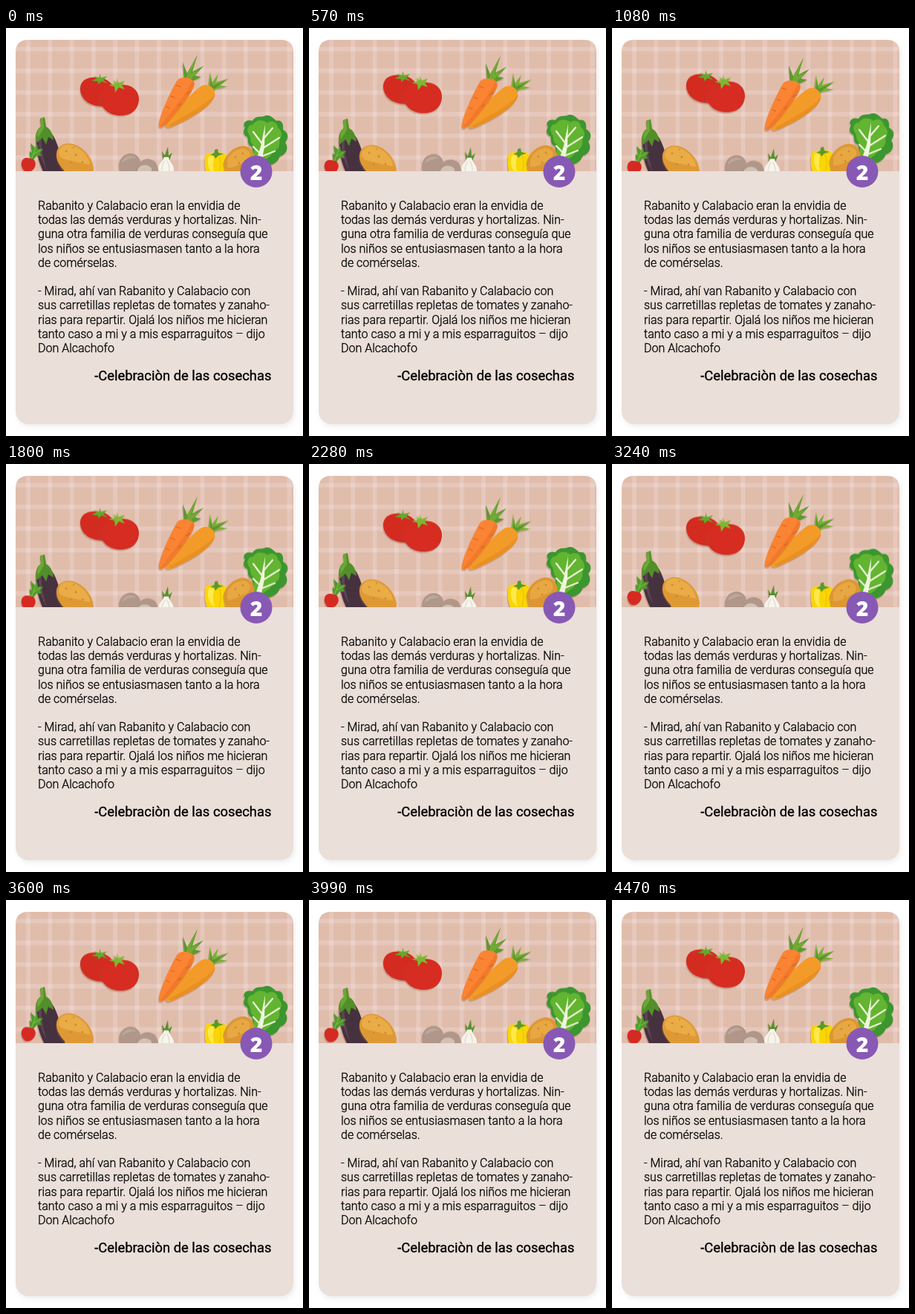
These frames come from a looping animation (400x550 px, 4500 ms). An HTML page:

```html
<!DOCTYPE html>
<html lang="es">
<head>
<meta charset="utf-8">
<title>Celebraciòn de las cosechas</title>
<style>
html, body { margin: 0; width: 100%; height: 100%; overflow: hidden; background: #fff; }
svg { display: block; width: 400px; height: 550px; }
.card { filter: drop-shadow(2px 3px 3px rgba(90, 80, 75, .1)); }
.veg { filter: drop-shadow(-1px 2px .5px rgba(140, 95, 70, .32)); }
.copy { font: 300 16px Roboto, sans-serif; stroke: #000; stroke-width: .32; }
.name { font: 400 18.4px Roboto, sans-serif; stroke: #000; stroke-width: .35; text-anchor: end; }
.num { font: 800 28.5px "Open Sans", Inter, sans-serif; fill: #fff; text-anchor: middle; }
.line { fill: none; stroke-linecap: round; stroke-linejoin: round; }
</style>
</head>
<body>
<svg viewBox="0 0 400 550">
  <defs>
    <clipPath id="top"><path d="M13 193V33Q13 16 30 16H370Q387 16 387 33V193Z"/></clipPath>
    <pattern id="cloth" x="27" y="25.5" width="29.3" height="29.2" patternUnits="userSpaceOnUse">
      <rect width="30" height="30" fill="#e0bcab"/>
      <path d="M0 0H6V30H0ZM0 0H30V6H0Z" fill="#e6c7bb"/>
      <path d="M0 0H6V6H0Z" fill="#ebd2c9"/>
    </pattern>
  </defs>

  <rect class="card" x="13" y="16" width="374" height="518" rx="17" fill="#eadfd9"/>

  <g clip-path="url(#top)">
    <rect x="13" y="16" width="374" height="177" fill="url(#cloth)"/>

    <g id="tomatoes">
      <g class="veg">
        <path d="M100 82C100 70 111 65 124 67C139 68 149 79 148 92C147 105 131 108 118 104C107 101 100 92 100 82Z" fill="#d32b20"/>
        <path d="M126 61L128 67L136 65L131 70L137 75L129 72L124 76L124 72L115 71L122 68L118 65L126 67Z" fill="#63a92c"/>
      </g>
      <g class="veg">
        <path d="M127 94C127 83 138 76 151 77C167 74 180 83 179 97C178 112 166 119 152 118C137 117 127 107 127 94Z" fill="#d62c21"/>
        <path d="M149 67L152 74L160 71L156 77L160 83L152 80L147 87L146 79L138 77L147 75L144 70L150 74Z" fill="#7cb930"/>
      </g>
    </g>

    <g id="carrots">
      <g class="veg">
        <path d="M272 83L275 59L277 74L286 62L283 73L300 68L287 77L299 79L283 82L278 88Z" fill="#78b034"/>
        <path d="M274 84L276 65L278 78L297 70L282 81Z" fill="#5b9530"/>
        <path d="M215 131C218 119 252 86 262 79C272 72 284 82 281 92C277 105 238 127 223 133C219 135 215 134 215 131Z" fill="#f39b29"/>
        <path d="M219 131C243 117 273 101 281 89C281 106 239 127 223 133Z" fill="#ea8f22"/>
      </g>
      <g class="veg">
        <path d="M240 70L238 46L244 61L258 36L251 59L266 51L254 64L263 66L248 73Z" fill="#5c9a2e"/>
        <path d="M242 70L245 60L257 38L249 61L260 56L247 71Z" fill="#72ab34"/>
        <path d="M206 132C205 120 225 79 231 70C237 64 253 67 254 75C253 88 222 124 213 132C210 135 207 135 206 132Z" fill="#fa8433"/>
        <path d="M207 133C224 112 244 86 251 71C254 73 254 77 251 83C242 98 222 124 213 132Z" fill="#f07a2a"/>
        <path class="line" d="M229 77L235 79M243 89L248 86M222 92L227 94M232 105L236 102M216 106L220 108" stroke="#d5641f" stroke-width="1.2"/>
      </g>
    </g>

    <g class="veg" id="eggplant">
      <path d="M41 146C39 164 44 184 56 205H82C76 180 70 153 62 143Z" fill="#46313f"/>
      <path d="M44 150C43 165 48 181 55 191C50 175 47 162 48 149Z" fill="#5d4453"/>
      <path d="M46 122L52 120L54 133C60 136 63 142 64 151L57 147L54 157L49 148L41 155C39 145 41 136 47 133Z" fill="#528f2a"/>
      <path d="M47 122L50 121L51 135L43 148C41 141 43 136 47 134Z" fill="#6aa936"/>
    </g>
    <g class="veg" id="potato">
      <path d="M68 170C68 157 83 152 95 158C108 164 117 177 118 190L116 205H91C78 193 67 182 68 170Z" fill="#df9934"/>
      <path d="M71 167C73 157 85 154 94 160C105 165 113 176 113 184C102 183 92 179 83 178C76 176 70 174 71 167Z" fill="#eaac47"/>
      <g fill="#c98729"><circle cx="81" cy="166" r="1.3"/><circle cx="94" cy="171" r="1.4"/><circle cx="103" cy="181" r="1.3"/><circle cx="87" cy="181" r="1.2"/><circle cx="91" cy="161" r="1"/></g>
    </g>
    <g class="veg" id="radish">
      <path d="M33 179C33 174 31 169 32 166L35 168L33 155L39 161L42 156L43 163L50 163L46 168L48 172L41 172L36 179Z" fill="#4f9b2b"/>
      <path class="line" d="M34 177L40 161M37 170L46 165" stroke="#78b941" stroke-width="1.3"/>
      <path d="M21 181C22 175 28 174 33 176C39 176 41 182 39 187C36 193 30 196 25 193C22 190 20 185 21 181Z" fill="#d52a22"/>
    </g>

    <g id="bulbs">
      <g class="veg">
        <path d="M153 190C150 178 158 169 168 169C177 169 183 177 181 188L177 200H156Z" fill="#b0978a"/>
        <path d="M156 182C157 173 168 169 176 175C168 175 161 178 156 182Z" fill="#bda69a"/>
      </g>
      <g class="veg">
        <path d="M177 190C178 180 186 175 194 177C203 179 207 187 203 200H178Z" fill="#b0978a"/>
        <path d="M177 191C181 183 191 183 196 189L195 201H178Z" fill="#d2c1b3"/>
      </g>
      <g class="veg">
        <path d="M212 179L210 166L214 172L218 160L219 172L224 168L219 181Z" fill="#55912e"/>
        <path d="M205 190C205 182 211 181 213 174H219C220 181 226 183 226 191L223 201H208Z" fill="#f7f4ec"/>
        <path class="line" d="M214 179Q208 186 211 198M217 179Q222 187 219 198" stroke="#d9d5c3"/>
      </g>
    </g>

    <g id="greens">
      <g class="veg">
        <path d="M268 180C266 171 272 166 280 169C287 165 299 169 300 178C301 190 295 199 287 205H275C269 196 267 188 268 180Z" fill="#fad508"/>
        <path d="M272 177C273 170 279 171 280 176C278 185 279 192 281 198C274 194 271 185 272 177Z" fill="#ffea4b"/>
        <path class="line" d="M287 173Q291 184 287 198" stroke="#efc204" stroke-width="1.3"/>
        <path d="M281 164L285 163L286 168L293 170L286 172L282 176L280 172L275 171L281 168Z" fill="#579b29"/>
      </g>
      <g class="veg">
        <path d="M335 190C331 178 334 168 331 160C324 157 327 151 325 147C318 144 320 137 322 134C317 127 325 123 332 125C336 118 343 120 347 119C355 115 360 122 364 125C373 123 374 132 373 137C381 141 381 149 376 154C382 163 376 171 369 173C366 182 357 185 352 186L342 196Z" fill="#3c962f"/>
        <path d="M335 184C333 174 335 166 333 158C328 153 330 149 328 145C323 139 325 130 333 130C338 122 347 124 352 128C359 123 366 128 366 134C373 140 372 147 368 151C370 160 365 165 360 166C356 174 350 177 345 180Z" fill="#62b431"/>
        <path d="M333 190L343 160L349 130L348 161L342 190Z" fill="#f1f6e0"/>
        <path class="line" d="M345 156L333 140M347 149L359 135M346 162L368 148M342 169L333 160M342 174L362 166" stroke="#eaf3d3" stroke-width="2.3"/>
      </g>
      <g class="veg">
        <path d="M293 183C295 171 306 160 319 159C330 159 337 169 334 181L325 205H297Z" fill="#dd9632"/>
        <path d="M298 178C302 168 313 161 322 163C330 166 331 174 325 179C315 183 305 190 298 188Z" fill="#e7a843"/>
        <g fill="#c98729"><circle cx="309" cy="174" r="1.3"/><circle cx="319" cy="169" r="1.3"/><circle cx="314" cy="182" r="1.2"/></g>
      </g>
    </g>
  </g>

  <circle cx="337" cy="193.5" r="21.5" fill="#8759b4"/>
  <text class="num" x="337" y="204.8">2</text>
  <g class="copy" id="copy"></g>
  <text class="name" x="357.5" y="475">-Celebraciòn de las cosechas</text>
</svg>
<script>
const lines = [
  'Rabanito y Calabacio eran la envidia de',
  'todas las demás verduras y hortalizas. Nin-',
  'guna otra familia de verduras conseguía que',
  'los niños se entusiasmasen tanto a la hora',
  'de comérselas.',
  '',
  '- Mirad, ahí van Rabanito y Calabacio con',
  'sus carretillas repletas de tomates y zanaho-',
  'rias para repartir. Ojalá los niños me hicieran',
  'tanto caso a mi y a mis esparraguitos – dijo',
  'Don Alcachofo'
];
const copy = document.getElementById('copy');
lines.forEach((line, i) => {
  const text = document.createElementNS('http://www.w3.org/2000/svg', 'text');
  text.setAttribute('x', 43);
  text.setAttribute('y', 245 + i * 19.2);
  text.textContent = line;
  copy.append(text);
});

// Each part bobs between two heights; some start halfway through a swing.
const HALF = 2250, MID = HALF / 2;
const bobs = {
  tomatoes: [4.5, -4.5, MID],
  carrots: [0, 8.5, 0],
  eggplant: [-3, 3, MID],
  potato: [-3, 3, MID],
  radish: [-4, 4, MID],
  bulbs: [0, 5, 0],
  greens: [0, -6, 0]
};
for (const [id, [from, to, lead]] of Object.entries(bobs)) {
  document.getElementById(id).animate(
    { transform: [from, to].map(y => `translateY(${y}px)`) },
    { duration: HALF, delay: -lead, direction: 'alternate', iterations: Infinity, easing: 'cubic-bezier(.364, 0, .636, 1)' }
  );
}
</script>
</body>
</html>
```
